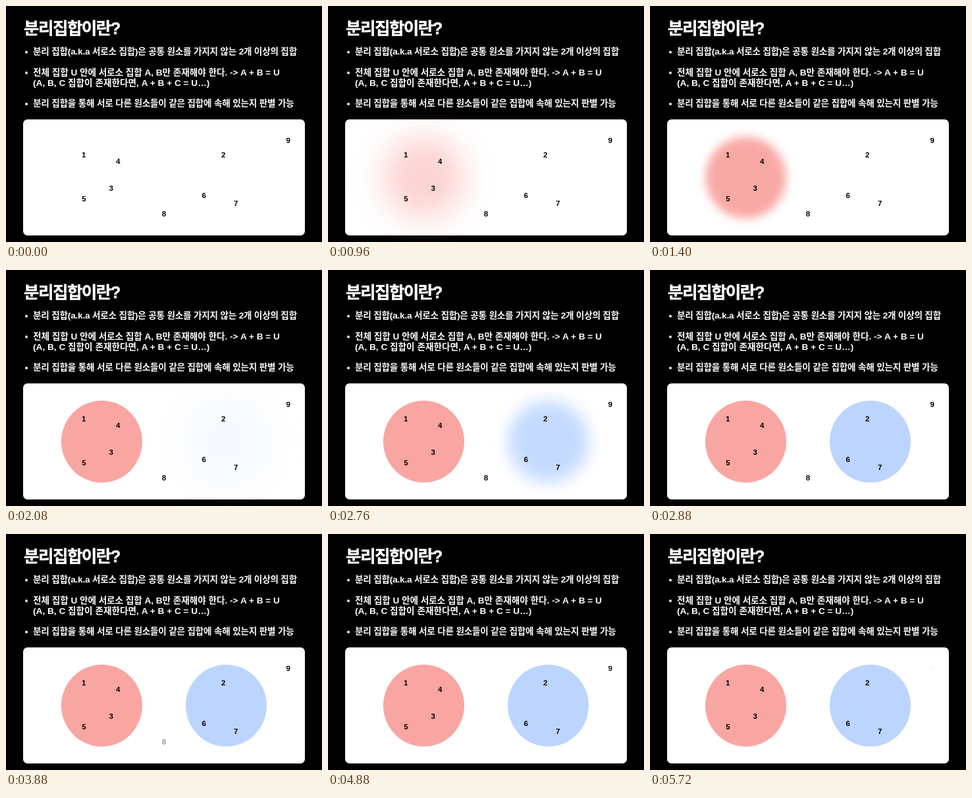
An HTML page that plays this animation: 480 by 360 pixels, repeating every 6.28 s.

```html
<!DOCTYPE html>
<html lang="ko">
<head>
<meta charset="utf-8">
<style>
  html, body { margin: 0; width: 100%; height: 100%; overflow: hidden; background: #000; }
  svg { display: block; width: 480px; height: 360px; }
  text { font: bold 13.6px "Liberation Sans", "Noto Sans CJK KR", sans-serif; fill: #fff; white-space: pre; }
  .title { font-size: 25.5px; letter-spacing: -1.5px; stroke: #fff; stroke-width: .5px; }
  .digit { font-size: 11.5px; fill: #000; text-anchor: middle; }
</style>
</head>
<body>
<svg viewBox="0 0 480 360">
  <rect x="26" y="173" width="428" height="177" rx="6.5" fill="#fff"/>
  <ellipse id="red" cx="145.5" cy="261.7" rx="61.5" ry="62.5" fill="#f9a6a2"/>
  <ellipse id="blue" cx="334.5" cy="261.7" rx="61.5" ry="62.5" fill="#bcd5ff"/>
  <text class="title" x="27" y="42.7">분리집합이란?</text>
  <g fill="#fff">
    <circle cx="31" cy="70.5" r="2"/>
    <circle cx="31" cy="102" r="2"/>
    <circle cx="31" cy="149.5" r="2"/>
  </g>
  <text x="41" y="74" letter-spacing="-.2">분리 집합(a.k.a 서로소 집합)은 공통 원소를 가지지 않는 2개 이상의 집합</text>
  <text x="41" y="105.5" letter-spacing="-.03">전체 집합 U 안에 서로소 집합 A, B만 존재해야 한다. -&gt; A + B = U</text>
  <text x="41" y="122" letter-spacing=".02">(A, B, C 집합이 존재한다면, A + B + C = U…)</text>
  <text x="41" y="153" letter-spacing="-.19">분리 집합을 통해 서로 다른 원소들이 같은 집합에 속해 있는지 판별 가능</text>
  <g id="digits"></g>
</svg>
<script>
  const LOOP = 6280, BUILD = 960, MAX_BLUR = 34;
  const $ = id => document.getElementById(id);
  const positions = [
    [118.3, 231.2], [330.2, 231.2], [159.8, 282], [170.2, 241], [118.5, 298],
    [300.8, 292.5], [349.2, 305.2], [240, 321], [428.8, 209]
  ];
  $("digits").innerHTML = positions.map(([x, y], i) =>
    `<text class="digit" x="${x}" y="${y}">${i + 1}</text>`).join("");
  const digits = $("digits").children;

  const progress = (t, start) => Math.min(1, Math.max(0, (t - start) / BUILD));

  function blurIn(shape, p) {
    shape.style.opacity = p;
    shape.style.filter = p < 1 ? `blur(${MAX_BLUR * Math.sqrt(1 - p)}px)` : "none";
  }

  function draw(now) {
    const t = now % LOOP;
    blurIn($("red"), progress(t, 480));
    blurIn($("blue"), progress(t, 1920));
    digits[7].style.opacity = 1 - progress(t, 3320);
    // The last digit leaves a faint trace until the loop restarts.
    digits[8].style.opacity = Math.max(.04, 1 - progress(t, 4800));
    requestAnimationFrame(draw);
  }
  requestAnimationFrame(draw);
</script>
</body>
</html>
```
